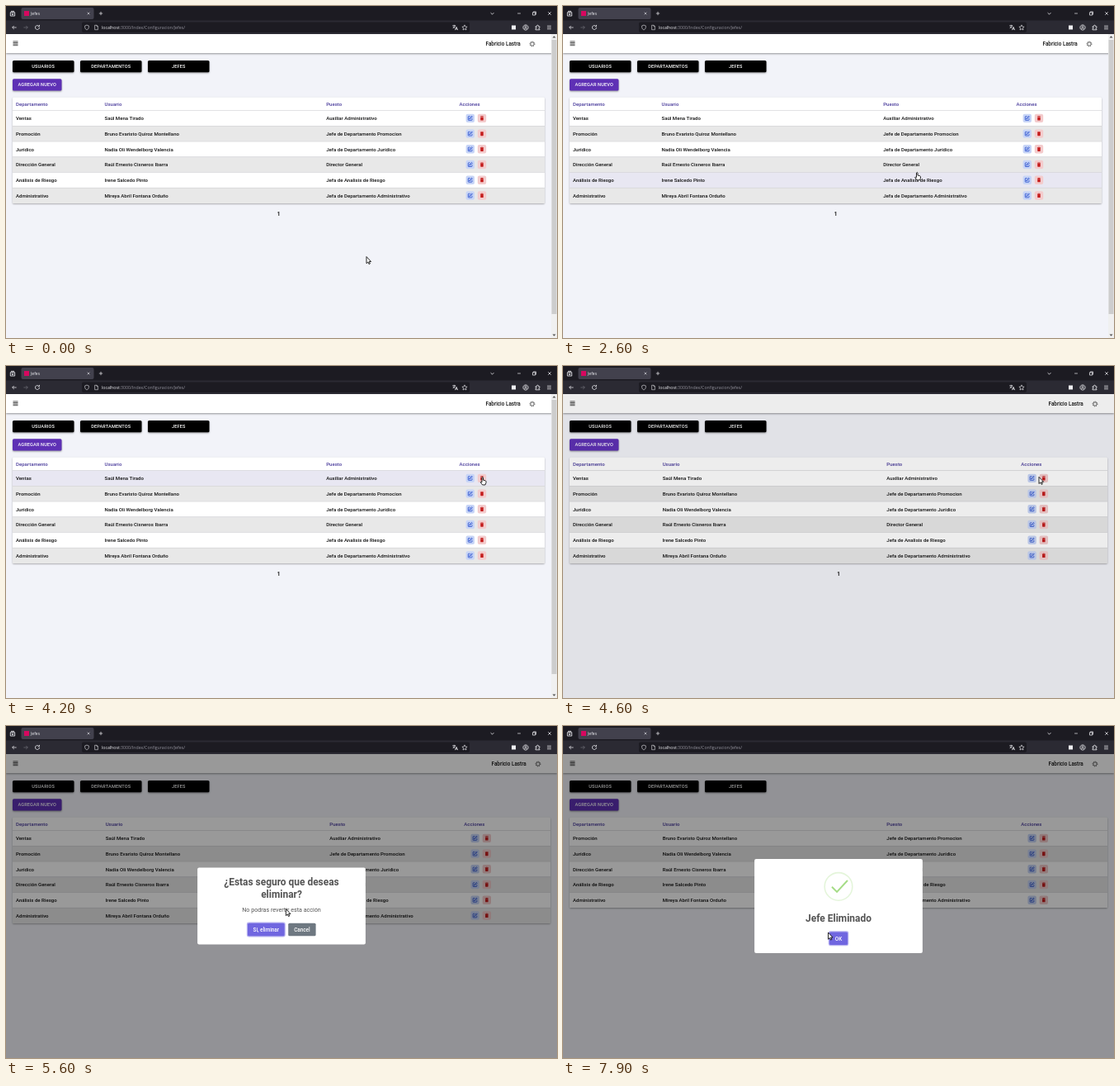
An HTML page with a canvas that plays this animation: 668x402 px, repeating every 8 s.

```html
<!DOCTYPE html>
<html lang="es">
<head>
<meta charset="utf-8">
<title>Jefes</title>
<style>
html, body { margin: 0; height: 100%; overflow: hidden; background: #f2f3f9; }
canvas { display: block; }
</style>
</head>
<body>
<canvas id="stage" width="668" height="402"></canvas>
<script>
const ctx = document.getElementById('stage').getContext('2d');
const LOOP = 8000, STEP = 100, ROW_TOP = 126.5, ROW_H = 18.72;
const DIALOG_AT = 4616, PRESS_AT = 7100, SUCCESS_AT = 7190, REMOVED_AT = 7500;

const people = [
  ['Ventas', 'Saúl Mena Tirado', 'Auxiliar Administrativo'],
  ['Promoción', 'Bruno Evaristo Quiroz Montellano', 'Jefe de Departamento Promocion'],
  ['Jurídico', 'Nadia Oli Wendelborg Valencia', 'Jefa de Departamento Jurídico'],
  ['Dirección General', 'Raúl Ernesto Cisneros Ibarra', 'Director General'],
  ['Análisis de Riesgo', 'Irene Salcedo Pinto', 'Jefa de Analisis de Riesgo'],
  ['Administrativo', 'Mireya Abril Fontana Orduño', 'Jefa de Departamento Administrativo'],
];

// Pointer path: time, x, y
const pointerPath = [
  [0, 437, 303.5], [500, 437, 303.5], [1300, 437, 263], [2200, 437, 263],
  [2600, 428.5, 201], [3000, 446, 185], [3400, 515.5, 133], [3900, 577, 134],
  [5000, 577, 134.5], [5500, 345, 212], [5900, 322.5, 250], [7600, 322.5, 250],
  [7900, 321.5, 250], [8000, 321.5, 250],
];

const shapes = {
  edit: 'M11 4H5a2 2 0 0 0-2 2v13a2 2 0 0 0 2 2h13a2 2 0 0 0 2-2v-6M18.5 2.5l3 3L12 15l-4 1 1-4z',
  trash: 'M6 19c0 1.1.9 2 2 2h8c1.1 0 2-.9 2-2V7H6zM19 4h-3.5l-1-1h-5l-1 1H5v2h14z',
  view: 'M4 8h16v13H4zM6 4h12M12 11l3 3.500-3 3.500-3-3.500z',
  cross: 'M6 6l12 12M18 6L6 18',
  plus: 'M12 4v16M4 12h16',
  chevron: 'M5 9l7 7 7-7',
  minus: 'M5 12h14',
  restore: 'M5 8h11v11H5zM8 8V5h11v11h-3',
  back: 'M21 12H4M11 5l-7 7 7 7',
  forward: 'M3 12h17M13 5l7 7-7 7',
  reload: 'M20 12a8 8 0 1 1-3-6.200M20 2v6h-6',
  shield: 'M12 2l8 3v6c0 6-4 9-8 11-4-2-8-5-8-11V5z',
  page: 'M5 2h9l5 5v15H5zM14 2v5h5',
  translate: 'M2 5h12M8 2v3M12 5c-1 5-5 8-9 9M5 8c1 3 4 5 6 6M12 22l5-12 5 12M14 18h6',
  star: 'M12 2l3 7 7 .6-5.300 4.800 1.700 7.200-6.400-4-6.400 4 1.700-7.200L2 9.600 9 9z',
  account: 'M12 2a10 10 0 1 0 .1 0zM12 6a3.500 3.500 0 1 0 .1 0zM6 18c2-5 10-5 12 0',
  puzzle: 'M4 8h5V6a3 3 0 0 1 6 0v2h5v5h-2a3 3 0 0 0 0 5h2v3H4v-5h2a2 2 0 0 0 0-4H4z',
  menu: 'M3 5h18M3 12h18M3 19h18',
  arrow: 'M0 0V8.200L1.900 6.500 3.100 9.100 4.400 8.500 3.200 6H5.600Z',
  hand: 'M2 6V1Q2.800-.3 3.500 1V4L6.300 4.700Q7.400 5.200 7 7.200L6 9.800H2.700L.2 6.700Q.5 5.400 2 6.600Z',
};
for (const name in shapes) shapes[name] = new Path2D(shapes[name]);

const clamp = v => Math.max(0, Math.min(1, v));
const easeOut = x => 1 - (1 - clamp(x)) ** 2.3;
const mix = (a, b, k) => a + (b - a) * k;

function rect(x, y, w, h, color) {
  ctx.fillStyle = color;
  ctx.fillRect(x, y, w, h);
}

function box(x, y, w, h, r, color, shadow = 0) {
  ctx.save();
  if (shadow) {
    ctx.shadowColor = `rgba(0,0,0,${shadow})`;
    ctx.shadowBlur = 2;
    ctx.shadowOffsetY = 1;
  }
  ctx.fillStyle = color;
  ctx.beginPath();
  ctx.roundRect(x, y, w, h, r);
  ctx.fill();
  ctx.restore();
}

// y is the middle of the capital letters
function text(str, x, y, size, color, { weight = 500, align = 'left', family = 'Roboto', spacing = 0 } = {}) {
  ctx.font = `${weight} ${size}px ${family}, sans-serif`;
  ctx.letterSpacing = spacing + 'px';
  ctx.textAlign = align;
  ctx.fillStyle = color;
  ctx.fillText(str, x, y + size * 0.356);
}

function icon(name, x, y, size, color, line = 2.5) {
  ctx.save();
  ctx.translate(x - size / 2, y - size / 2);
  ctx.scale(size / 24, size / 24);
  ctx.fillStyle = ctx.strokeStyle = color;
  ctx.lineWidth = line;
  if (line) ctx.stroke(shapes[name]);
  else ctx.fill(shapes[name]);
  ctx.restore();
}

function ring(x, y, r, width, color, dash = []) {
  ctx.strokeStyle = color;
  ctx.lineWidth = width;
  ctx.setLineDash(dash);
  ctx.beginPath();
  ctx.arc(x, y, r, 0, 7);
  ctx.stroke();
  ctx.setLineDash([]);
}

function drawBrowser() {
  const light = '#f0f0f4', font = { weight: 400, family: '"Open Sans"' };
  rect(0, 0, 668, 18, '#1c1b22');
  rect(0, 17.5, 668, 16.5, '#2b2a33');
  box(18.5, 2, 88, 14, 2, '#42414d');
  rect(22, 6, 6, 6, '#d6085f');
  text('Jefes', 30, 9, 5, light, font);
  icon('view', 8, 9, 8, light);
  icon('cross', 100, 9, 5.5, light);
  icon('plus', 115, 9, 6.5, light);
  icon('chevron', 589.5, 9, 6.5, light, 3);
  icon('minus', 622, 9, 6.5, light);
  icon('restore', 640.5, 9, 7, light);
  icon('cross', 659, 9, 7, light);
  icon('back', 10, 26, 7, light);
  icon('forward', 24, 26, 7, '#6d6c75');
  icon('reload', 38, 26, 7.5, light);
  box(92, 19.5, 470, 12.5, 2, '#1c1b22');
  icon('shield', 98, 26, 7, light, 2);
  icon('page', 109.5, 26, 6.5, light, 2);
  text('localhost', 116, 26, 5.2, light, font);
  const host = ctx.measureText('localhost').width;
  text(':3000/Index/Configuracion/Jefes/', 116 + host, 26, 5.2, '#92919b', font);
  icon('translate', 544.5, 26, 7.5, light);
  icon('star', 556, 26, 7.5, light, 2);
  rect(613, 23.5, 5, 5, light);
  icon('account', 630, 26, 7.5, light);
  icon('puzzle', 644.5, 26, 7.5, light);
  icon('menu', 658.5, 26, 6.5, light);
}

function drawScrollbar() {
  rect(661, 34, 7, 368, '#f0f0f0');
  rect(661.5, 41, 6, 332, '#cdcdcd');
  for (const [y, dir] of [[37.5, -1], [398.5, 1]]) {
    ctx.fillStyle = '#505050';
    ctx.beginPath();
    ctx.moveTo(662.5, y - dir);
    ctx.lineTo(666.5, y - dir);
    ctx.lineTo(664.5, y + dir * 1.3);
    ctx.fill();
  }
}

function drawTable(rows, hovered, pageWidth) {
  const width = pageWidth - 16;
  const columns = [0, 1 / 6, 7 / 12, 5 / 6].map(k => 12 + k * width);
  const height = ROW_TOP - 110.5 + rows.length * ROW_H;
  box(8, 110.5, width, height, 1.5, '#fff', 0.35);
  ['Departamento', 'Usuario', 'Puesto', 'Acciones'].forEach((label, i) =>
    text(label, columns[i], 118.5, 6.05, '#4a3c9c'));
  rows.forEach((row, i) => {
    const top = ROW_TOP + i * ROW_H, mid = top + ROW_H / 2;
    rect(8, top, width, ROW_H, i === hovered ? '#e8e7f2' : i % 2 ? '#e8e8e8' : '#fff');
    rect(8, top - 0.2, width, 0.6, '#cfcfd2');
    row.forEach((cell, j) => text(cell, columns[j], mid + 0.2, 6.05, '#111'));
    const x = columns[3];
    box(x + 8.1, mid - 5.2, 10.4, 10.4, 2, '#c8d5f6');
    icon('edit', x + 13.3, mid, 6.6, '#1d46cc', 2.8);
    box(x + 22.3, mid - 5.2, 10.4, 10.4, 2, '#f3cccd');
    icon('trash', x + 27.5, mid, 7, '#c41c1c', 0);
  });
  text('1', pageWidth / 2, 110.5 + height + 13, 6.4, '#111', { weight: 700, align: 'center' });
}

function drawPage(t, hovered) {
  const pageWidth = t < 4600 ? 661 : 668, shift = pageWidth - 661;
  rect(0, 34, 668, 368, '#f2f3f9');
  box(0, 34, 668, 23, 0, '#fff', 0.4);
  for (let i = 0; i < 4; i++) rect(8.5, 42.4 + i * 1.6, 6, 1, '#555');
  text('Fabricio Lastra', 581.5 + shift, 45.8, 6.37, '#111');
  ring(638 + shift, 46, 2.1, 0.8, '#555');
  ring(638 + shift, 46, 2.9, 1, '#555', [1.2, 1.08]);
  const caps = { align: 'center', spacing: 0.16 };
  ['USUARIOS', 'DEPARTAMENTOS', 'JEFES'].forEach((label, i) => {
    box(8 + i * 82, 66, 74.5, 14.3, 1.6, '#000', 0.4);
    text(label, 45.2 + i * 82, 73, 5.57, '#fff', caps);
  });
  box(8, 88.3, 59.5, 14.3, 1.6, '#5e30b5', 0.4);
  text('AGREGAR NUEVO', 37.7, 95.5, 5.57, '#fff', caps);
  drawTable(t < REMOVED_AT ? people : people.slice(1), hovered, pageWidth);
  if (!shift) drawScrollbar();
}

function popupScale(age) {
  const p = age / 300;
  if (p < 0.45) return mix(0.7, 1.05, easeOut(p / 0.45));
  if (p < 0.8) return mix(1.05, 0.95, easeOut((p - 0.45) / 0.35));
  return mix(0.95, 1, easeOut((p - 0.8) / 0.2));
}

function button(label, x, y, w, color, focused, shade = 0) {
  if (focused) box(x - 1.2, y - 1.2, w + 2.4, 18, 2.4, '#b8b3f0');
  box(x, y, w, 15.6, 1.6, color);
  if (shade) box(x, y, w, 15.6, 1.6, `rgba(0,0,0,${shade})`);
  text(label, x + w / 2, y + 7.9, 6.37, '#fff', { align: 'center' });
}

function popup(age, height, drawBody) {
  const scale = popupScale(age);
  ctx.save();
  ctx.translate(334, 218);
  ctx.scale(scale, scale);
  ctx.translate(-334, -218);
  box(232.1, 218 - height / 2, 203.8, height, 2, '#fff');
  drawBody(age);
  ctx.restore();
}

const heading = (str, y) => text(str, 334, y, 11.94, '#545454', { weight: 600, align: 'center' });

function drawConfirm(shade) {
  heading('¿Estas seguro que deseas', 188.8);
  heading('eliminar?', 203.3);
  text('No podras revertir esta acción', 334, 222.3, 7.16, '#545454', { weight: 400, align: 'center' });
  button('Si, eliminar', 293, 238.7, 44.6, '#7066e0', true, shade);
  button('Cancel', 342.2, 238.7, 33.4, '#6e7881');
}

function drawSuccess(age) {
  ring(334, 194.4, 16.8, 1.6, 'rgba(165,220,134,.3)');
  const drawn = clamp((age / 750 - 0.54) / 0.36);
  if (drawn) {
    ctx.strokeStyle = '#a5dc86';
    ctx.lineWidth = 2;
    ctx.setLineDash([28 * drawn, 99]);
    ctx.beginPath();
    ctx.moveTo(326, 194.8);
    ctx.lineTo(332.1, 200.9);
    ctx.lineTo(345, 187);
    ctx.stroke();
    ctx.setLineDash([]);
  }
  heading('Jefe Eliminado', 232.5);
  button('OK', 322.9, 249.4, 22.2, '#7066e0', true);
}

function pointerAt(t) {
  const i = pointerPath.findIndex(key => key[0] > t);
  const [t0, x0, y0] = pointerPath[i - 1], [t1, x1, y1] = pointerPath[i];
  const k = (t - t0) / (t1 - t0);
  return [mix(x0, x1, k), mix(y0, y1, k)];
}

function drawPointer(x, y, isHand) {
  const shape = isHand ? shapes.hand : shapes.arrow;
  ctx.save();
  ctx.translate(x - (isHand ? 2 : 0), y);
  ctx.lineWidth = 0.9;
  ctx.lineJoin = 'round';
  ctx.strokeStyle = '#111';
  ctx.fillStyle = '#fff';
  ctx.fill(shape);
  ctx.stroke(shape);
  ctx.restore();
}

function draw(t) {
  const [x, y] = pointerAt(t);
  const row = Math.floor((y - ROW_TOP + 1) / ROW_H);
  const hovered = t < 4600 && row >= 0 && row < people.length ? row : -1;
  const onConfirm = t > DIALOG_AT && t < SUCCESS_AT && x > 293 && x < 338 && y > 238 && y < 255;
  drawBrowser();
  drawPage(t, hovered);
  if (t >= 4600) rect(0, 34, 668, 368, `rgba(0,0,0,${Math.min(0.4, 0.07 + (t - 4600) * 0.004)})`);
  if (t >= SUCCESS_AT) popup(t - SUCCESS_AT, 114, drawSuccess);
  else if (t >= DIALOG_AT) {
    const shade = t >= PRESS_AT ? 0.2 : onConfirm ? 0.1 : 0;
    popup(t - DIALOG_AT, 92.8, () => drawConfirm(shade));
  }
  drawPointer(x, y, hovered >= 0 || onConfirm);
}

function tick(now) {
  draw(Math.floor((now % LOOP) / STEP) * STEP);
  requestAnimationFrame(tick);
}
requestAnimationFrame(tick);
</script>
</body>
</html>
```
